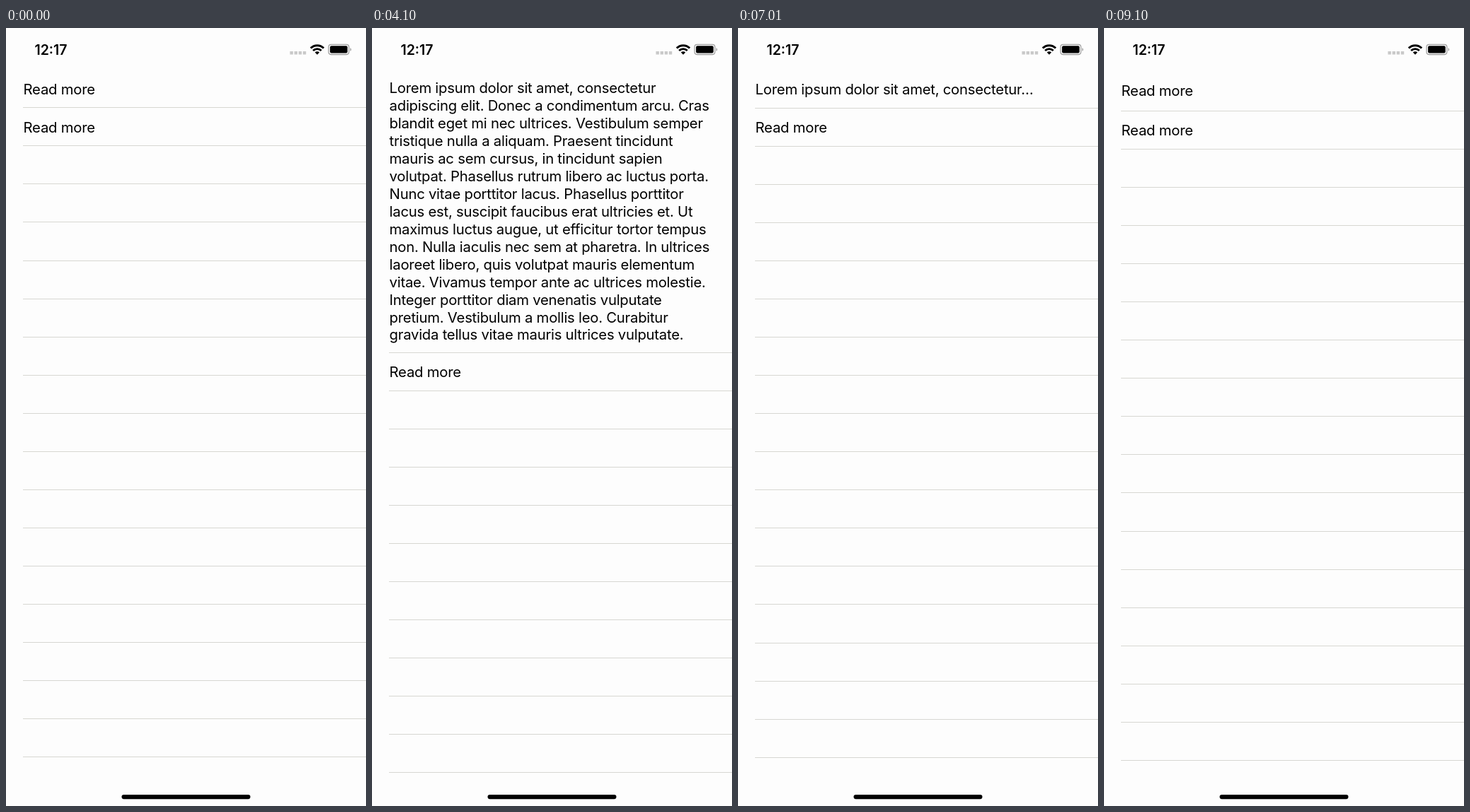
Write an HTML page that moves like this. It is 509 px wide and 1101 px high and loops after 9.18 s.

```html
<!DOCTYPE html>
<html lang="en">
<head>
<meta charset="utf-8">
<title>Expandable list</title>
<style>
  html, body { margin: 0; width: 100%; height: 100%; overflow: hidden; background: #fdfdfd; }
  svg { display: block; width: 100%; height: 100%; }
  text { font-family: Inter, sans-serif; font-size: 20.3px; letter-spacing: -.24px; }
  .clock { font-size: 19.5px; font-weight: 600; letter-spacing: 0; text-anchor: middle; }
</style>
</head>
<body>
<svg viewBox="0 0 509 1101">
  <rect width="509" height="1101" fill="#fdfdfd"/>
  <g id="list"></g>

  <text class="clock" x="63.5" y="37.8">12:17</text>
  <path d="M401.5 35.3h23" stroke="#c9c9c9" stroke-width="4.4" stroke-dasharray="4.4 1.7"/>
  <g fill="none" stroke="#000" stroke-width="2.9">
    <path d="M430.8 28.6a13 13 0 0 1 18.4 0"/>
    <path d="M434.2 32a8.2 8.2 0 0 1 11.6 0"/>
    <path d="M440 37.8l-3.2-3.2a4.6 4.6 0 0 1 6.4 0z" fill="#000" stroke="none"/>
  </g>
  <rect x="456.1" y="23.3" width="28.7" height="14.2" rx="3.4" fill="none" stroke="#a0a0a0" stroke-width="1.3"/>
  <rect x="458.1" y="25.3" width="24.7" height="10.2" rx="1.9"/>
  <path d="M486.6 28v4.8q1.6-.7 1.6-2.4t-1.6-2.4" fill="#a0a0a0"/>
  <rect x="163.5" y="1085" width="182" height="6.2" rx="3.1"/>
</svg>
<script>
const LOOP = 9180, DURATION = 350;
const LEFT = 24.6, TOP = 58.75, BOTTOM = 1060;
const ROW = 54.05, LINE = 24.95, PADDING = 26.3;
const BASELINE = 7.8; // from the middle of a line

const paragraphs = [
`Lorem ipsum dolor sit amet, consectetur
adipiscing elit. Donec a condimentum arcu. Cras
blandit eget mi nec ultrices. Vestibulum semper
tristique nulla a aliquam. Praesent tincidunt
mauris ac sem cursus, in tincidunt sapien
volutpat. Phasellus rutrum libero ac luctus porta.
Nunc vitae porttitor lacus. Phasellus porttitor
lacus est, suscipit faucibus erat ultricies et. Ut
maximus luctus augue, ut efficitur tortor tempus
non. Nulla iaculis nec sem at pharetra. In ultrices
laoreet libero, quis volutpat mauris elementum
vitae. Vivamus tempor ante ac ultrices molestie.
Integer porttitor diam venenatis vulputate
pretium. Vestibulum a mollis leo. Curabitur
gravida tellus vitae mauris ultrices vulputate.`,
`Praesent et mollis sapien. Sed eu laoreet quam.
Nunc et felis eu magna rhoncus tincidunt et at
urna. Duis lorem ipsum, ornare et lacus laoreet,
elementum pretium est. Suspendisse quis sapien
dictum, semper eros eu, facilisis nibh.
Vestibulum ante ipsum primis in faucibus orci
luctus et ultrices posuere cubilia curae;
Maecenas eget justo leo. Duis sollicitudin nec
urna at rhoncus. Mauris eros mauris, tempus
quis justo sit amet, porttitor lobortis ex. In est
sapien, mattis ut vehicula eget, fringilla sit amet
magna.`].map(text => text.split("\n"));

// The screen refreshes in a few held steps between "from" and "to".
const moves = [
  { from: 2160, to: 2610, steps: 7, start: 2225, row: 0, open: true },
  { from: 4030, to: 4470, steps: 7, start: 4085, row: 0, open: false },
  { from: 5000, to: 5440, steps: 7, start: 5060, row: 1, open: true },
  { from: 5890, to: 6260, steps: 6, start: 5895, row: 1, open: false },
  { from: 6930, to: 7380, steps: 7, start: 6995, row: 0, open: true },
  { from: 8720, to: 9100, steps: 6, start: 8779, row: 0, open: false },
];

const clamp = v => Math.min(1, Math.max(0, v));

// cubic-bezier(.42, 0, .58, 1)
function easeInOut(x) {
  let low = 0, high = 1;
  for (let i = 0; i < 24; i++) {
    const s = (low + high) / 2;
    const px = 1.26 * (1 - s) ** 2 * s + 1.74 * (1 - s) * s * s + s ** 3;
    if (px < x) low = s; else high = s;
  }
  return low * low * (3 - 2 * low);
}

function progressOf(move, time) {
  const gap = (move.to - move.from) / (move.steps - 1);
  const step = Math.min(move.steps - 1, Math.floor((time - move.from) / gap + 1e-6));
  return clamp((move.from + step * gap - move.start) / DURATION);
}

// Shows as many lines as fit the row, cut off with an ellipsis.
function visibleLines(lines, height) {
  const count = Math.max(1, Math.floor((height - PADDING) / LINE + .05));
  if (count >= lines.length) return lines;
  const shown = lines.slice(0, count);
  shown[count - 1] = shown[count - 1].replace(/[.,;]?$/, "…");
  return shown;
}

function textBlock(lines, center) {
  const first = center - (lines.length - 1) / 2 * LINE + BASELINE;
  return lines.map((line, i) =>
    `<text x="${LEFT}" y="${first + i * LINE}">${line}</text>`).join("");
}

const separator = y =>
  `<rect x="24" y="${Math.round(y - .5)}" width="485" height="1" fill="#d7d7d2"/>`;

function render(time) {
  const move = moves.findLast(m => time >= m.from);
  const progress = move ? progressOf(move, time) : 0;
  let y = TOP, height, markup = "";

  paragraphs.forEach((lines, row) => {
    const moving = move && move.row === row;
    const amount = !moving ? 0 : move.open ? easeInOut(progress) : 1 - easeInOut(progress);
    const expanded = moving && (move.open ? progress > 0 : progress === 0);
    height = ROW + (lines.length * LINE + PADDING - ROW) * amount;
    const shown = expanded ? visibleLines(lines, height) : ["Read more"];
    markup += textBlock(shown, y + height / 2);
    y += height;
    markup += separator(y);
  });

  // Empty rows repeat the height of the last one.
  for (y += height; y < BOTTOM; y += height) markup += separator(y);
  list.innerHTML = markup;
}

const list = document.getElementById("list");
const begin = performance.now();
function tick() {
  render((performance.now() - begin) % LOOP);
  requestAnimationFrame(tick);
}
tick();
</script>
</body>
</html>
```
